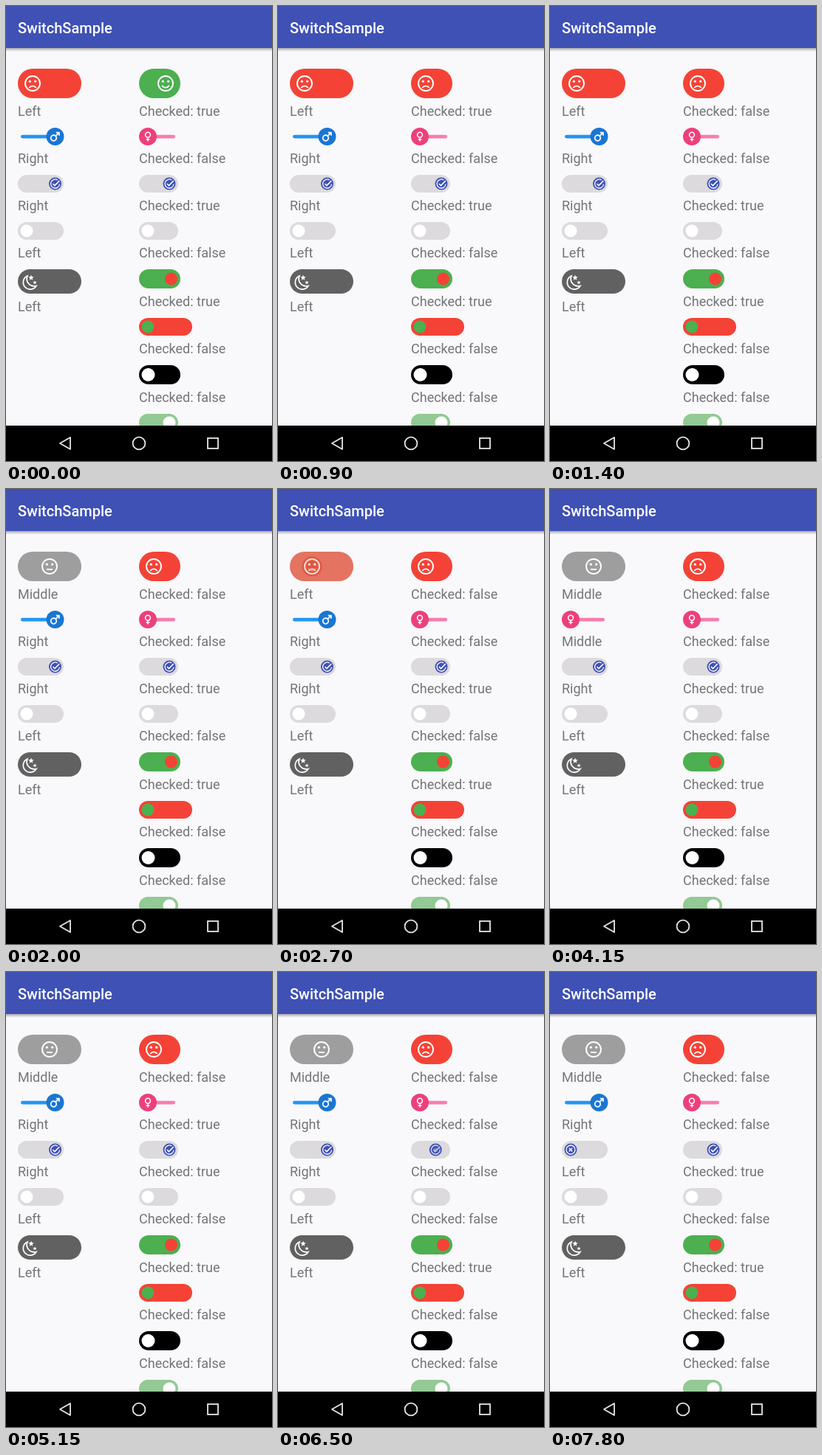
Write an HTML page that moves like this. It is 360x617 px and loops after 8000 ms.

```html
<!DOCTYPE html>
<html lang="en">
<head>
<meta charset="utf-8">
<title>SwitchSample</title>
<style>
html, body { margin: 0; width: 100%; height: 100%; overflow: hidden; background: #f9f8fb; }
svg { display: block; width: 360px; height: 617px; font: 18px Roboto, sans-serif; }
.line { fill: none; stroke: #fff; }
</style>
</head>
<body>
<svg id="stage" viewBox="0 0 360 617"></svg>
<script>
const RED = '#f44336', GREEN = '#4caf50', GRAY = '#9e9e9e', PALE = '#dcdadd', BLUE = '#3f51b5';

const line = (d, w = 1.7) => `<path class="line" stroke-width="${w}" d="${d}"/>`;
const disc = (x, y, r, fill) => `<circle cx="${x}" cy="${y}" r="${r}" fill="${fill}"/>`;
const ring = (x, y, r, w) => `<circle class="line" cx="${x}" cy="${y}" r="${r}" stroke-width="${w}"/>`;
const pill = (x, y, w, h, fill) => `<rect x="${x}" y="${y}" width="${w}" height="${h}" rx="${h / 2}" fill="${fill}"/>`;
const text = (x, y, s, attrs = 'fill="#757575"') => `<text x="${x}" y="${y}" ${attrs}>${s}</text>`;
const face = mouth => ring(0, 0, 10, 1.9) + disc(-3.7, -2.8, 1.6, '#fff') + disc(3.7, -2.8, 1.6, '#fff') + line(mouth, 1.8);

function star(x, y, r) {
  const pts = Array.from({ length: 10 }, (_, i) => {
    const a = i * Math.PI / 5, d = i % 2 ? r * 0.42 : r;
    return [x + d * Math.sin(a), y - d * Math.cos(a)].map(v => v.toFixed(1));
  });
  return `<polygon fill="#fff" points="${pts.join(' ')}"/>`;
}

// Every list runs left, middle, right.
const mood = {
  track: [RED, GRAY, GREEN], thumb: [RED, GRAY, GREEN], r: 13.5,
  icon: [face('M-4.8 6Q0 .6 4.8 6'), face('M-4 4H4'), face('M-5 2.8Q0 8.6 5 2.8')]
};
const gender = {
  track: ['#f97bae', '#bdbdbd', '#2196f3'], thumb: ['#ec407a', '#757575', '#1976d2'], r: 12, slim: true,
  icon: [
    ring(0, -2.3, 3.4, 1.5) + line('M0 1.2V6.6M-2.5 4H2.5', 1.5),
    ring(0, 0, 4, 1.6),
    ring(-2, 2, 3.8, 1.7) + line('M.8 -.8L5.2 -5.2M1.2 -5.4H5.4V-1.2')
  ]
};
const check = {
  track: [PALE, PALE, PALE], thumb: [BLUE, BLUE, BLUE], r: 8.5,
  icon: [
    ring(0, 0, 6, 1.3) + line('M-2.2 -2.2L2.2 2.2M2.2 -2.2L-2.2 2.2', 1.5),
    ring(0, 0, 6, 1.3) + line('M-2.8 0H2.8', 1.5),
    line('M3.2 -5.1A6 6 0 1 0 6 .5', 1.3) + line('M-3 0L-.6 2.5L5.8 -4', 1.6)
  ]
};

const tri = ['Left', 'Middle', 'Right'];
const two = ['Checked: false', '', 'Checked: true'];
// ends: thumb centres at the left and right stops; moves: [start, new state]
const switches = [
  { look: mood, x: 16, y: 85, w: 86, h: 40, ends: [36, 82], names: tri, base: 149, first: 0,
    moves: [[1850, 1], [2200, 2], [2600, 0], [3100, 1]] },
  { look: mood, x: 180, y: 85, w: 56, h: 40, ends: [200, 216], names: two, base: 149, first: 2,
    moves: [[500, 0], [900, 2], [1250, 0]] },
  { look: gender, x: 16, y: 165, w: 62, h: 24, ends: [28, 66.5], names: tri, base: 213, first: 2,
    moves: [[3650, 0], [4150, 1], [4600, 2]] },
  { look: gender, x: 180, y: 165, w: 53, h: 24, ends: [192, 221], names: two, base: 213, first: 0,
    moves: [[5150, 2], [5650, 0]] },
  { look: check, x: 16, y: 229, w: 62, h: 24, ends: [28, 66.5], names: tri, base: 277, first: 2,
    moves: [[7250, 1], [7600, 0]] },
  { look: check, x: 180, y: 229, w: 53, h: 24, ends: [192, 221], names: two, base: 277, first: 2,
    moves: [[6450, 0], [6750, 2]] }
];

// Both layers are translucent during a fade, so the page shows through.
const fade = (a, b, p) => a === b || p >= 1 ? b : `<g opacity="${1 - p}">${a}</g><g opacity="${p}">${b}</g>`;

function drawSwitch(s, t) {
  let from = s.first, to = s.first, p = 1;
  for (const [start, state] of s.moves) if (t >= start) {
    from = to;
    to = state;
    p = Math.min(1, (t - start) / 145);
  }
  const { look, ends } = s, cy = s.y + s.h / 2;
  const at = i => ends[0] + (ends[1] - ends[0]) * i / 2;
  const ease = 0.5 - Math.cos(p * Math.PI) / 2;
  const x = at(from) + (at(to) - at(from)) * ease;
  const track = i => look.slim ? pill(s.x + 4, cy - 2.2, s.w - 8, 4.6, look.track[i])
                               : pill(s.x, s.y, s.w, s.h, look.track[i]);
  const thumb = i => disc(0, 0, look.r, look.thumb[i]);
  return fade(track(from), track(to), p) +
    `<g transform="translate(${x} ${cy})">${fade(thumb(from), thumb(to), p)}${fade(look.icon[from], look.icon[to], p)}</g>` +
    text(s.x, s.base, s.names[to]);
}

const fixed = (x, y, w, h, fill, tx, dot, r = 8.5) => pill(x, y, w, h, fill) + disc(tx, y + h / 2, r, dot);

const still =
  fixed(16, 293, 62, 24, PALE, 28, '#fff') + text(16, 341, tri[0]) +
  fixed(180, 293, 53, 24, PALE, 192, '#fff') + text(180, 341, two[0]) +
  pill(16, 357, 86, 33, '#616161') +
  line('M29 366A9.5 9.5 0 1 0 41 379.5A10 10 0 0 1 29 366Z', 1.7) +
  star(34, 368.5, 4) + star(39, 375, 2.8) + text(16, 414, tri[0]) +
  fixed(180, 357, 56, 26, GREEN, 223.5, RED) + text(180, 407, two[2]) +
  fixed(180, 423, 72, 24, RED, 192, GREEN) + text(180, 471, two[0]) +
  fixed(180, 487, 56, 26, '#000', 192.5, '#fff', 9) + text(180, 537, two[0]) +
  fixed(180, 553, 53, 24, '#92c994', 221, '#fff');

const chrome =
  `<defs><linearGradient id="shade" x2="0" y2="1"><stop stop-opacity=".3"/><stop offset="1" stop-opacity="0"/></linearGradient></defs>
  <rect y="57" width="360" height="5" fill="url(#shade)"/>
  <rect width="360" height="57" fill="${BLUE}"/>
  ${text(16, 37, 'SwitchSample', 'fill="#fff" font-size="20" font-weight="500"')}
  <rect y="569" width="360" height="48"/>
  <g fill="none" stroke="#e6e6e6" stroke-width="1.8">
    <path d="M87 585V601L73 593Z" stroke-linejoin="round"/>
    <circle cx="180" cy="593" r="8.4"/>
    <rect x="273" y="586" width="14" height="14"/>
  </g>`;

const stage = document.getElementById('stage');
let shown = -1;

function draw(now) {
  const t = Math.floor(now % 8000 / 50) * 50;
  if (t !== shown) {
    shown = t;
    stage.innerHTML = switches.map(s => drawSwitch(s, t)).join('') + still + chrome;
  }
  requestAnimationFrame(() => draw(performance.now() - begin));
}
const begin = performance.now();
draw(0);
</script>
</body>
</html>
```
